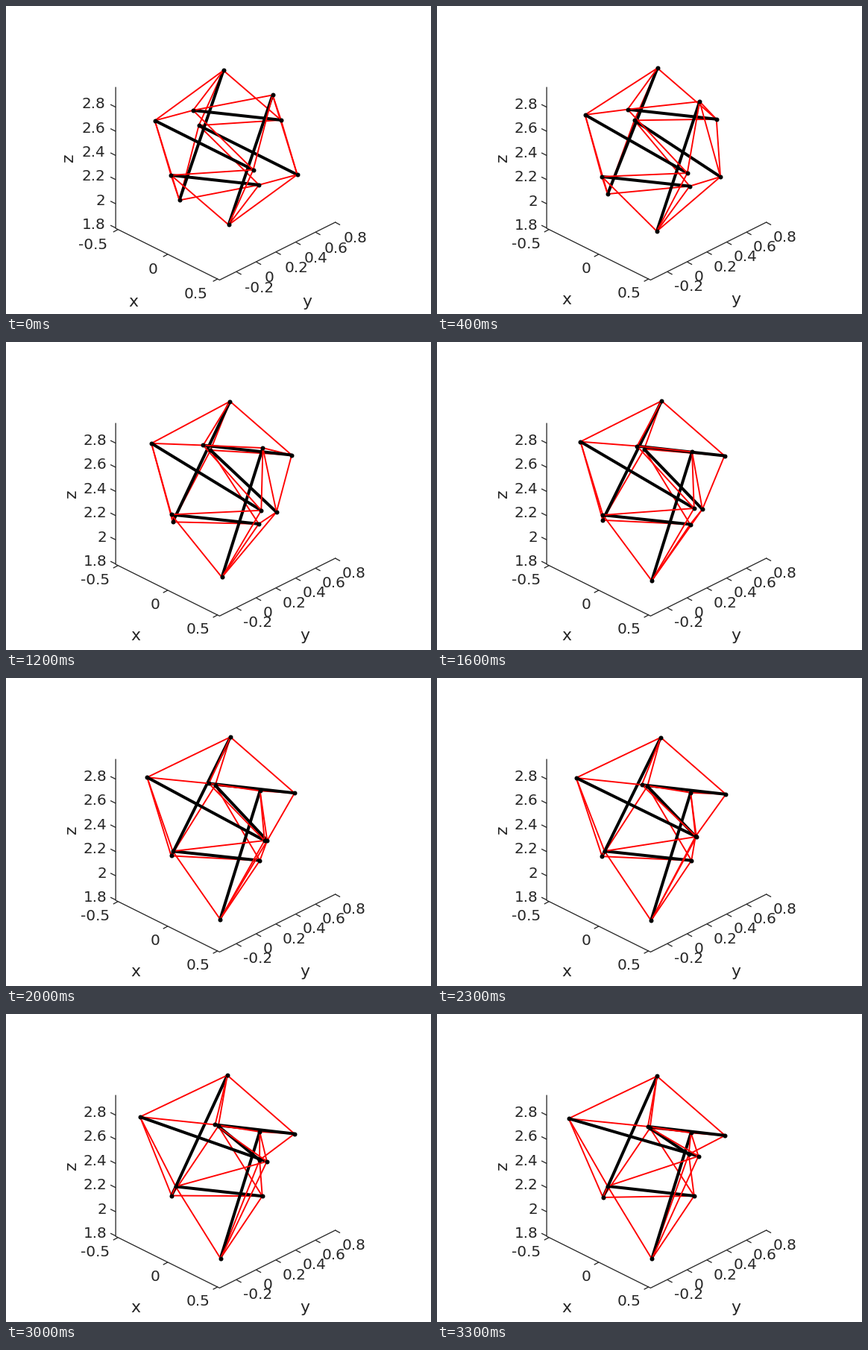
Recreate the animation shown at these times as a matplotlib script. Size 570x413 px, loop 3400 ms.

```python
from itertools import combinations, product

import numpy as np
import matplotlib.pyplot as plt
from matplotlib.animation import FuncAnimation
from matplotlib.collections import LineCollection

W, H, DPI = 570, 413, 64
PX = 72 / DPI  # points per pixel
FRAMES, STEP = 34, 100
INK = "#262626"

# Screen vectors of the three strut directions, and the middle of the body
CENTRE = np.array([295.5, 190.3])
STRUTS = np.array([[59, -174], [132, 66], [118, 13]], float)

# Per joint: total drift x, y and sideways bow x, y of its path
MOTION = np.array([
    [-10, -14.5, -5.5, -14.5], [3.5, -3, 8, -6],
    [-10.5, 35, -5.5, 9.8], [-17, 40, -7.3, 8.5],
    [-23, -13.5, 4, -13.5], [19, -29, 4, 17.5],
    [27, -7, 6.2, -13.2], [-53, -38, -9, 16.5],
    [7.5, 4, -2.5, 3.2], [5.5, 4, -2.5, 2.7],
    [32, 11, 2, -5.7], [17.5, 10, 8.3, -5.2]])


def make_joints():
    """Two parallel unit struts along each axis, half a unit apart."""
    joints = np.zeros((12, 3))
    for n, (k, side, end) in enumerate(product(range(3), (-1, 1), (-1, 1))):
        joints[n, k] = end / 2
        joints[n, (k + 1) % 3] = side / 4
    return joints


joints = make_joints()
bars = [(n, n + 1) for n in range(0, 12, 2)]
cables = [(a, b) for a, b in combinations(range(12), 2)
          if np.isclose(np.sum((joints[a] - joints[b])**2), 0.375)]

# Far edges first
depth = joints @ np.cross(STRUTS[:, 0], -STRUTS[:, 1])
edges = sorted(bars + cables, key=lambda e: depth[e[0]] + depth[e[1]])
is_bar = [e in bars for e in edges]
edges = np.array(edges)
rest = CENTRE + joints @ STRUTS

fig = plt.figure(figsize=(W / DPI, H / DPI), dpi=DPI, facecolor="white")
ax = fig.add_axes([0, 0, 1, 1])
ax.set(xlim=(0.4, W + 0.4), ylim=(H + 0.4, 0.4))
ax.axis("off")

labels = []


def line(xs, ys):
    ax.plot(xs, ys, color=INK, lw=1.3 * PX, solid_capstyle="butt")


def label(text, x, y, shift, size=20, **kw):
    """Add a label that moves by shift after the first step."""
    t = ax.text(x, y, text, color=INK, fontsize=size * PX,
                family="DejaVu Sans", **kw)
    labels.append((t, np.array([x, y], float), np.array(shift, float)))


def tick(x, y, dx, dy):
    line([x, x + dx], [y, y + dy])


line([147.5, 147.5, 286.8, 442.8], [109, 298.5, 367.8, 290])

for i, s in enumerate(["1.8", "2", "2.2", "2.4", "2.6", "2.8"]):
    y = 298 - 32.4 * i
    tick(147.5, y, -7, -3.5)
    label(s, 134, y + 1.7, (1.5, 0.7), ha="right")

for i, s in enumerate(["-0.5", "0", "0.5"]):
    x, y = 150.7 + 66.9 * i, 300 + 33.1 * i
    tick(x, y, -6.5, 3.5)
    label(s, x - 13.8, y + 26.2, (3, -1), ha="right")

for i, s in enumerate(["-0.2", "0", "0.2", "0.4", "0.6", "0.8"]):
    x, y = 309.5 + 26.5 * i, 356.9 - 13.3 * i
    tick(x, y, 6.5, 3.5)
    label(s, x + 11.3, y + 27.3, (-2.5, -1.5), ha="left")

mid = dict(size=22, ha="center", va="center")
label("x", 171, 397.5, (3, -3), **mid)
label("y", 404, 397, (-3, -3), **mid)
label("z", 84, 204, (4, 0), rotation=90, **mid)

frame = LineCollection([], colors=np.where(is_bar, "black", "red"),
                       linewidths=np.where(is_bar, 4, 1.9) * PX,
                       capstyle="butt", zorder=3)
ax.add_collection(frame, autolim=False)
dots, = ax.plot([], [], "o", color="black", ms=6 * PX, mew=0, zorder=4)


def draw(i):
    s = i / (FRAMES - 1)
    p = rest + MOTION[:, :2] * s + MOTION[:, 2:] * np.sin(np.pi * s**0.9)
    frame.set_segments(p[edges])
    dots.set_data(p[:, 0], p[:, 1])
    for text, home, shift in labels:
        text.set_position(home + shift * (i > 0))
    return frame, dots


anim = FuncAnimation(fig, draw, frames=FRAMES, interval=STEP,
                     repeat=True, repeat_delay=0)
plt.show()
```
